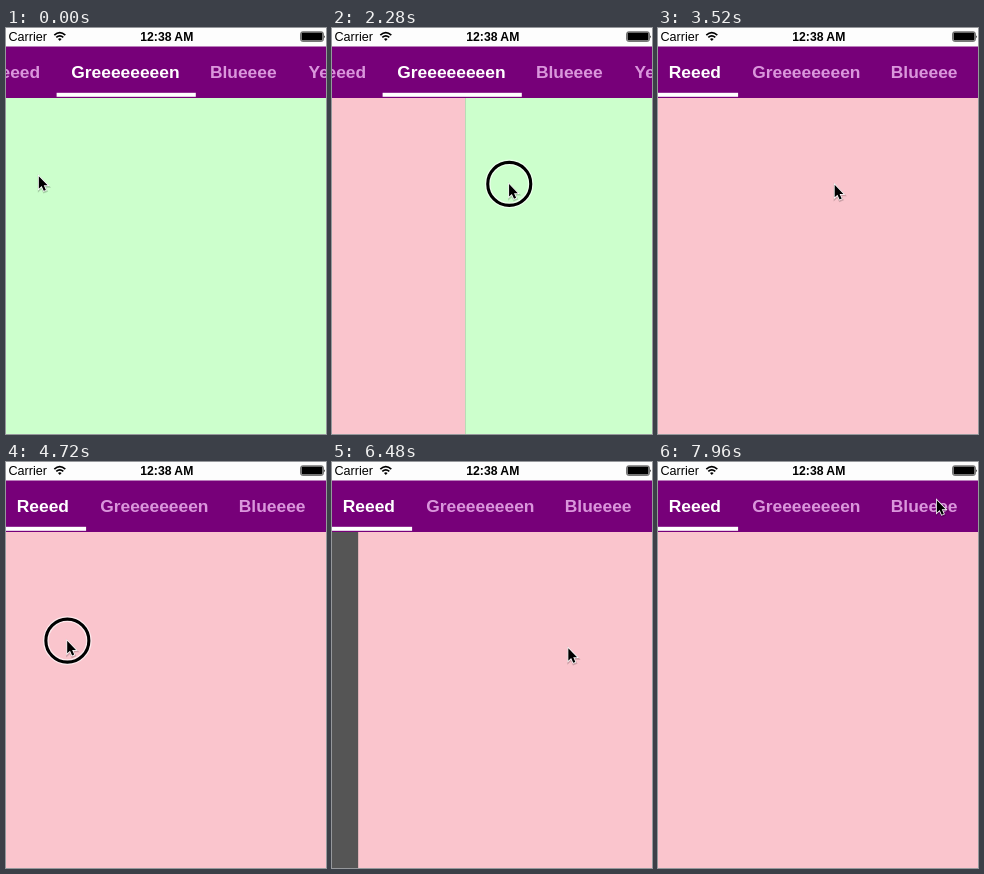
An HTML page that plays this animation: 320x406 px, repeating every 8 s.

```html
<!DOCTYPE html>
<html lang="en">
<head>
<meta charset="utf-8">
<title>Swipeable tabs</title>
<style>
  html, body { margin: 0; width: 100%; height: 100%; overflow: hidden; background: #555; }
  svg { display: block; width: 100vw; height: 100vh; }
  text { font-family: "Liberation Sans", Arial, sans-serif; white-space: pre; }
  .tab { font-size: 17.4px; font-weight: bold; }
</style>
</head>
<body>
<svg viewBox="0 0 320 406" preserveAspectRatio="none">
  <rect width="320" height="406" fill="#555"/>
  <g id="pages">
    <rect y="69" width="320" height="337" fill="#fac5cd"/>
    <rect x="320" y="69" width="320" height="337" fill="#ccffcc"/>
  </g>
  <rect y="18" width="320" height="52" fill="#770079"/>
  <g id="tabs"></g>
  <rect id="bar" y="64.8" height="4" fill="#fff"/>

  <rect width="320" height="18.5" fill="#fdfdfd"/>
  <text x="2.5" y="13" font-size="12.6">Carrier</text>
  <text x="160.8" y="13" font-size="12.2" font-weight="bold" text-anchor="middle">12:38 AM</text>
  <g fill="none" stroke="#000" stroke-width="1.7">
    <path d="M48.3 7.2Q53.8 2.2 59.3 7.2"/>
    <path d="M50.3 9.4Q53.8 6.2 57.3 9.4"/>
  </g>
  <path d="M52 11Q53.8 9.4 55.6 11L53.8 13Z"/>
  <rect x="294.6" y="3.8" width="22.8" height="9.6" rx="2" fill="none" stroke="#000" stroke-width=".6"/>
  <rect x="295.5" y="4.6" width="21" height="8" rx="1"/>
  <path d="M318 7.2Q319.6 8.7 318 10.2Z"/>

  <g id="cursor">
    <g id="ring" fill="none">
      <circle cx="1" cy="2" r="21.5" stroke="#fff" stroke-opacity=".65" stroke-width="5.6"/>
      <circle cx="1" cy="2" r="21.5" stroke="#000" stroke-width="3.1"/>
    </g>
    <g transform="translate(.3 1.5) scale(.88)">
      <path d="M.6 .8V15L3.8 12 6.2 17.4 8.6 16.4 6.2 11.1H10.6Z" fill="none"
        stroke="#000" stroke-opacity=".18" stroke-width="3" transform="translate(.4 1.2)"/>
      <path d="M.6 .8V15L3.8 12 6.2 17.4 8.6 16.4 6.2 11.1H10.6Z"
        stroke="#fff" stroke-width="1.8" paint-order="stroke"/>
    </g>
  </g>
</svg>
<script>
const LOOP = 8000, STEP = 40, PAGE = 320, PAD = 15.5;
const $ = id => document.getElementById(id);
const clamp = v => Math.min(1, Math.max(0, v));
const ease = u => u * u * (3 - 2 * u);
const mix = (a, b, u) => a + (b - a) * u;
const phase = (t, a, b) => ease(clamp((t - a) / (b - a)));

// time, x, y of the pointer tip
const path = [
  [0, 32, 146], [1000, 32, 146], [1600, 33, 150], [1900, 33, 150],
  [2320, 180, 154], [3440, 180, 154], [4200, 45, 174], [4360, 45, 176],
  [4570, 45, 176], [5430, 235.5, 184], [7080, 235.5, 184],
  [7860, 270, 40], [7960, 278, 36], [8000, 278, 36]
];
const presses = [[1760, 2320], [4560, 6200]];

function pointer(t) {
  const i = path.findIndex(k => k[0] > t);
  const [t0, x0, y0] = path[i - 1], [t1, x1, y1] = path[i];
  const u = phase(t, t0, t1);
  return [mix(x0, x1, u), mix(y0, y1, u)];
}

// resistance when pulling past the first page
const rubber = d => PAGE * (1 - 1 / (Math.max(0, d) * 0.55 / PAGE + 1));

// x of the first page's right edge
function edge(t, x) {
  if (t < 2320) return Math.max(0, x - 43);
  if (t < 4500) {
    const left = 183 * Math.exp((2320 - t) / 102);
    return PAGE - (left < 0.4 ? 0 : left);
  }
  if (t < 6210) return PAGE + rubber(x - 63);
  const s = (t - 6210) * 0.0081;
  return PAGE + rubber(172.5) * (1 + s) * Math.exp(-s);
}

const widths = [52.4, 107.6, 67.6, 80];
let left = 10.8;
const tabs = ["Reeed", "Greeeeeeeen", "Blueeee", "Yeeellow"].map((label, i) => {
  const el = document.createElementNS("http://www.w3.org/2000/svg", "text");
  el.textContent = label;
  el.setAttribute("class", "tab");
  el.setAttribute("x", left);
  el.setAttribute("y", 49.8);
  $("tabs").append(el);
  const tab = { el, x: left - PAD, w: widths[i] + 2 * PAD };
  left += tab.w;
  return tab;
});

function tint(el, on) {
  const c = [[218, 255], [150, 255], [220, 255]].map(([a, b]) => Math.round(mix(a, b, on)));
  el.setAttribute("fill", `rgb(${c})`);
}

function draw(t) {
  const [x, y] = pointer(t);
  $("cursor").setAttribute("transform", `translate(${x} ${y})`);
  const down = presses.some(([a, b]) => t >= a && t < b);
  $("ring").setAttribute("visibility", down ? "visible" : "hidden");
  $("pages").setAttribute("transform", `translate(${edge(t, x) - PAGE} 0)`);

  const u = phase(t, 2900, 3220);
  const shift = mix(-28.9, 0, u), [a, b] = tabs;
  $("tabs").setAttribute("transform", `translate(${shift} 0)`);
  $("bar").setAttribute("x", mix(b.x, a.x, u) + shift + 0.8);
  $("bar").setAttribute("width", mix(b.w, a.w, u) + 0.6);
  tabs.forEach((tab, i) => tint(tab.el, i === 0 ? u : i === 1 ? 1 - u : 0));
}

const start = performance.now();
function tick() {
  const t = (performance.now() - start) % LOOP;
  draw(Math.floor(t / STEP) * STEP);
  requestAnimationFrame(tick);
}
tick();
</script>
</body>
</html>
```
